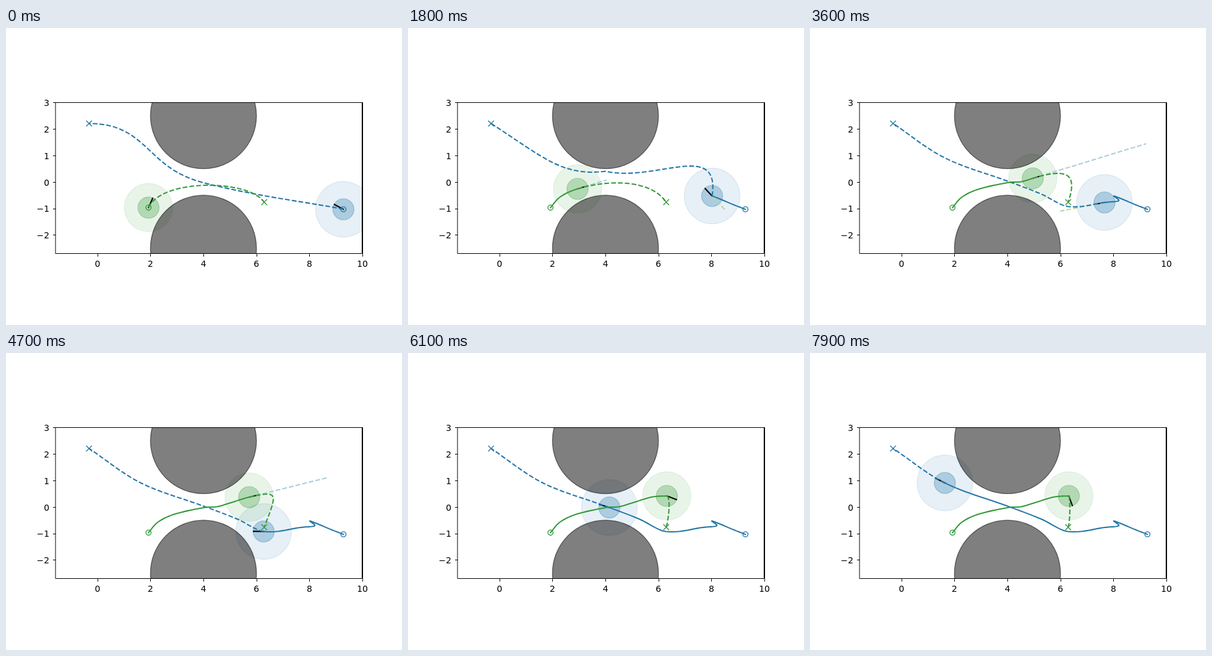
An HTML page with a canvas for the animation above (8000 ms loop, 640 by 480 pixels).

```html
<!DOCTYPE html>
<html lang="en">
<head>
<meta charset="utf-8">
<title>Two robots crossing a gap</title>
<style>
html, body { margin: 0; width: 100%; height: 100%; overflow: hidden; background: #fff; }
canvas { display: block; width: 640px; height: 480px; }
</style>
</head>
<body>
<canvas id="stage" width="640" height="480"></canvas>
<script>
const ctx = document.getElementById("stage").getContext("2d");
const STEP = 100, STEPS = 80;
const LEFT = 80, RIGHT = 576, TOP = 120.5, BOTTOM = 364.5, UNIT = 42.83;
const px = x => 147.8 + x * UNIT;
const py = y => 248.83 - y * UNIT;

// Keyed rows start with a step: track is x, y; heading is degrees; sight is forecast length.
const blue = {
  color: "#2577a8", light: "#aacddb", outer: 45, goal: [134.3, 154.3], plan: bluePlan,
  track: [
    [0, 545.3, 293], [8, 527, 286], [18, 491.5, 271.5], [26, 499, 279], [36, 476, 282],
    [47, 416.5, 288.5], [54, 374, 268.5], [61, 325.5, 249.7], [79, 218, 210], [96, 134.3, 154.3]
  ],
  heading: [[0, 208], [18, 227], [36, 169], [61, 197], [79, 207]],
  sight: [[14, 0], [18, -30], [27, 50], [36, 73], [41, 80]]
};
const green = {
  color: "#35993a", light: "#b4d7a0", outer: 39, goal: [417.3, 281.5], plan: greenPlan,
  track: [
    [0, 230.3, 290.3], [9, 246, 273], [18, 274, 260], [27, 322, 249.5],
    [31, 341, 248.5], [36, 360, 243], [47, 393, 233], [61, 418.3, 231]
  ],
  heading: [[0, -66], [18, -17], [27, -4], [36, -17], [47, -14], [61, 21], [79, 70]],
  sight: [[14, 0], [18, 49], [27, 243], [47, 129], [54, 90]]
};
const bots = [blue, green];

// Before it settles, blue steers by Bezier handles: two up to the gap, gap height, two after it.
const SETTLED = 36, GAP = 319;
const handles = [
  [10, 500, 283, 413, 274, 250, 225, 226, 230, 155],
  [18, 505, 180, 400, 250, 231.5, 250, 240, 220, 210],
  [27, 430, 318, 391, 272, 252.5, 262, 240, 195, 196],
  [SETTLED, 410, 300, 390, 275, 248, 245, 228, 180, 190]
];

// Values of keyed rows at step t: Hermite when smooth, otherwise linear.
function at(keys, t, smooth) {
  const last = keys.length - 1;
  t = Math.min(Math.max(t, keys[0][0]), keys[last][0]);
  let i = 0;
  while (i < last - 1 && t > keys[i + 1][0]) i++;
  const a = keys[i], b = keys[i + 1], h = b[0] - a[0], u = (t - a[0]) / h;
  const slope = (k, d) => {
    const p = keys[Math.max(k - 1, 0)], q = keys[Math.min(k + 1, last)];
    return (q[d] - p[d]) / (q[0] - p[0]);
  };
  return a.slice(1).map((v, j) => {
    const d = j + 1, w = b[d];
    if (!smooth) return v + (w - v) * u;
    const s = u * u * (3 - 2 * u);
    return v + (w - v) * s + h * u * (1 - u) * ((1 - u) * slope(i, d) - u * slope(i + 1, d));
  });
}

function ease(t, from, to) {
  const u = Math.min(Math.max((t - from) / (to - from), 0), 1);
  return u * u * (3 - 2 * u);
}

const place = (bot, n) => at(bot.track, n, true);

// The point at a distance along the robot's heading.
function ahead(bot, n, dist) {
  const [x, y] = place(bot, n), a = at(bot.heading, n)[0] * Math.PI / 180;
  return [x + dist * Math.cos(a), y + dist * Math.sin(a)];
}

function polyline(points) {
  const path = new Path2D();
  points.forEach(p => path.lineTo(...p));
  return path;
}

function travelled(bot, from, to) {
  return polyline(Array.from({ length: to - from + 1 }, (_, i) => place(bot, from + i)));
}

function bluePlan(n) {
  if (n >= SETTLED) return travelled(blue, n, 96);
  const [ax, ay, bx, by, gapY, cx, cy, dx, dy] = at(handles, n);
  const path = polyline([place(blue, n)]);
  path.bezierCurveTo(ax, ay, bx, by, GAP, gapY);
  path.bezierCurveTo(cx, cy, dx, dy, ...blue.goal);
  return path;
}

// One curve to the goal: its last bend swings outward, then flattens on arrival.
function greenPlan(n) {
  const turn = ease(n, 24, 38), size = 1 - 0.85 * ease(n, 47, 61), [gx, gy] = green.goal;
  const path = polyline([place(green, n)]);
  path.bezierCurveTo(...ahead(green, n, 52 * size),
    gx + (45 * turn - 25) * size, gy - (37 + 15 * turn) * size, gx, gy);
  return path;
}

function stroke(path, color, width, dashed) {
  ctx.strokeStyle = color;
  ctx.lineWidth = width;
  ctx.lineJoin = "round";
  ctx.lineCap = dashed ? "butt" : "square";
  ctx.setLineDash(dashed ? [7.7, 3.33] : []);
  ctx.stroke(path);
  ctx.setLineDash([]);
}

function disc(x, y, r, color, alpha) {
  ctx.globalAlpha = alpha;
  ctx.beginPath();
  ctx.arc(x, y, r, 0, Math.PI * 2);
  ctx.fillStyle = ctx.strokeStyle = color;
  ctx.lineWidth = 1.39;
  ctx.fill();
  ctx.stroke();
  ctx.globalAlpha = 1;
}

function markers(bot) {
  const [sx, sy] = place(bot, 0), [gx, gy] = bot.goal, r = 4.17;
  const path = new Path2D();
  path.arc(sx, sy, r, 0, Math.PI * 2);
  for (const s of [-1, 1]) {
    path.moveTo(gx - r, gy - s * r);
    path.lineTo(gx + r, gy + s * r);
  }
  stroke(path, bot.color, 1.39);
}

function axes() {
  const label = v => String(v).replace("-", "\u2212");
  const tick = (...ends) => stroke(polyline(ends), "#000", 1);
  ctx.fillStyle = "#000";
  ctx.font = "13.89px 'DejaVu Sans', sans-serif";
  ctx.strokeStyle = "#000";
  ctx.lineWidth = 1;
  ctx.strokeRect(LEFT + 0.5, TOP, RIGHT - LEFT, BOTTOM - TOP);
  ctx.textAlign = "center";
  for (let v = 0; v <= 10; v += 2) {
    const x = Math.round(px(v)) + 0.5;
    tick([x, BOTTOM + 1], [x, BOTTOM + 4.5]);
    ctx.fillText(label(v), px(v), 385.5);
  }
  ctx.textAlign = "right";
  for (let v = -2; v <= 3; v++) {
    const y = Math.round(py(v)) + 0.5;
    tick([LEFT - 4, y], [LEFT, y]);
    ctx.fillText(label(v), 70, py(v) + 5.8);
  }
}

function draw(n) {
  ctx.fillStyle = "#fff";
  ctx.fillRect(0, 0, 640, 480);
  ctx.save();
  ctx.beginPath();
  ctx.rect(LEFT, TOP, RIGHT - LEFT + 1, BOTTOM - TOP);
  ctx.clip();
  for (const bot of bots) {
    const [x, y] = place(bot, n);
    disc(x, y, bot.outer, bot.color, 0.11);
    disc(x, y, 17.1, bot.color, 0.3);
  }
  for (const y of [2.5, -2.5]) disc(px(4), py(y), 2 * UNIT, "#000", 0.5);
  for (const bot of bots) {
    stroke(polyline([place(bot, n), ahead(bot, n, 16.5)]), "#000", 2.08);
  }
  // Each robot's forecast is drawn in the other one's pale colour.
  bots.forEach((bot, i) => {
    const s = bot.sight;
    if (n <= s[0][0] || n > s[s.length - 1][0]) return;
    stroke(polyline([place(bot, n), ahead(bot, n, at(s, n)[0])]), bots[1 - i].light, 2.08, true);
  });
  for (const bot of bots) {
    if (n) stroke(travelled(bot, 0, n), bot.color, 2.08);
    stroke(bot.plan(n), bot.color, 2.08, true);
    markers(bot);
  }
  stroke(polyline([[RIGHT, TOP], [RIGHT, BOTTOM]]), "#000", 2.08);
  ctx.restore();
  axes();
}

const begin = performance.now();
function tick() {
  draw(Math.floor((performance.now() - begin) / STEP) % STEPS);
  requestAnimationFrame(tick);
}
tick();
</script>
</body>
</html>
```
